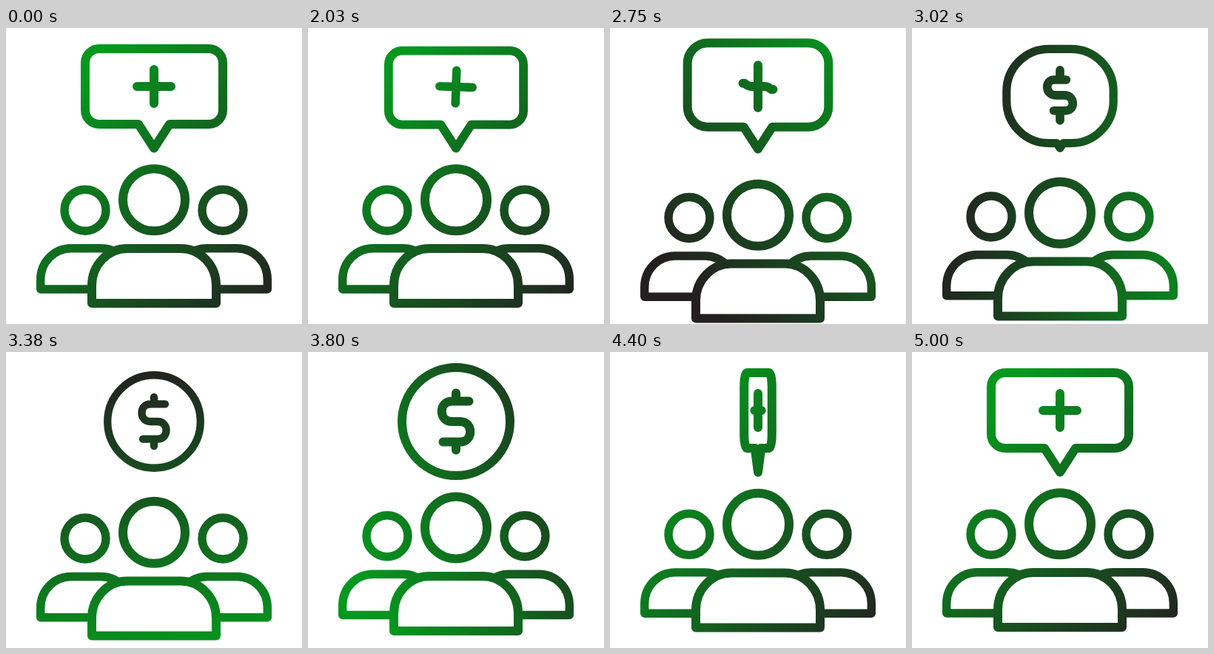
Animation of 400x400 px, one loop 5.03 s. Source, as an HTML page:

```html
<!DOCTYPE html>
<html lang="en">
<head>
<meta charset="utf-8">
<title>Group value</title>
<style>
  html, body { margin: 0; width: 100%; height: 100%; overflow: hidden; background: #fff; }
  svg { display: block; width: 100vw; height: 100vh; }
  .ink { fill: none; stroke: #fff; stroke-width: 12; stroke-linecap: round; stroke-linejoin: round; }
  .front { fill: #000; }
  #sides { stroke-width: 11.4; }
</style>
</head>
<body>
<svg viewBox="0 0 400 400">
  <defs>
    <linearGradient id="shade" gradientUnits="userSpaceOnUse" x1="50" y1="210" x2="450" y2="210">
      <stop offset="0" stop-color="#06981e"/>
      <stop offset="1" stop-color="#231f20"/>
    </linearGradient>
    <g id="side">
      <circle cx="107" cy="246.2" r="28"/>
      <path d="M46.7 353V339.7A41 42 0 0 1 87.7 297.7H128A42 42 0 0 1 170 339.7V353Z"/>
    </g>
    <mask id="lines" maskUnits="userSpaceOnUse" x="0" y="0" width="400" height="400">
      <g class="ink">
        <g id="sides">
          <use href="#side"/>
          <use href="#side" transform="matrix(-1 0 0 1 400 0)"/>
        </g>
        <g id="main">
          <circle cx="200" cy="232.3" r="42"/>
          <path class="front" d="M116 372V348A48 50 0 0 1 164 298H236A48 50 0 0 1 284 348V372Z"/>
        </g>
        <path id="bubble"/>
        <path id="sign"/>
      </g>
    </mask>
  </defs>
  <rect width="400" height="400" fill="url(#shade)" mask="url(#lines)"/>
</svg>
<script>
const LOOP = 5030, HOLD = 2030, STEP = 30;
const el = id => document.getElementById(id);
const lerp = (a, b, p) => a + (b - a) * p;

// Eased progress from 0 to 1 between two times, with a long settling end
function ease(t, from, to) {
  const u = Math.min(1, Math.max(0, (t - from) / (to - from)));
  const x = 1 - (1 - u) ** 1.4;
  return x * x * (3 - 2 * x);
}

// Grow from low to high, shrink while morphing, then spring to full size
function swell(t, low, high) {
  if (t < HOLD) return 1;
  const grown = lerp(low, high, ease(t, HOLD, 2550));
  const shrunk = lerp(grown, 0.86, ease(t, 2700, 3380));
  return lerp(shrunk, 1, ease(t, 3380, 3640));
}

// Speech bubble at p = 0, coin at p = 1; k squeezes it sideways
function bubblePath(p, k, s) {
  const anchor = lerp(163, 94, p);
  const x = v => 200 + v * k * s;
  const y = v => anchor + (v - anchor) * s;
  const w = lerp(93, 73, p), top = lerp(28, 21, p), bottom = lerp(130, 167, p);
  const r = lerp(19, 73, p), tail = lerp(21, 0, p), tip = lerp(162.5, 167, p);
  const corner = (cx, cy) => `A${r * k * s} ${r * s} 0 0 0 ${x(cx)} ${y(cy)}`;
  return `M${x(0)} ${y(tip)}L${x(tail)} ${y(bottom)}H${x(w - r)}` + corner(w, bottom - r)
    + `V${y(top + r)}` + corner(w - r, top) + `H${x(r - w)}` + corner(-w, top + r)
    + `V${y(bottom - r)}` + corner(r - w, bottom) + `H${x(-tail)}Z`;
}

// One half of the plus bar and of the S, relative to the middle
const BAR = [-23, -17, -14, -11, -8];
const CURL = [[17.5, -27.5], [-5.5, -27.5], [-23.8, -27.5], [-23.8, 0], [-5.5, 0]];

function signPath(p, k, s, tilt) {
  const c = Math.cos(tilt), n = Math.sin(tilt), mid = lerp(79, 94, p);
  const at = (x, y) =>
    `${200 + (x * c - y * n) * k * s} ${94 + (mid + x * n + y * c - 94) * s}`;
  const half = BAR.map((bx, i) => [lerp(bx, CURL[i][0], p), CURL[i][1] * p]);
  const a = half.map(([x, y]) => at(x, y));
  const b = half.map(([x, y]) => at(-x, -y));
  const near = lerp(0, 28, p), far = lerp(23, 38.5, p);
  return `M${a[0]}L${a[1]}C${a[2]} ${a[3]} ${a[4]}L${b[4]}C${b[3]} ${b[2]} ${b[1]}L${b[0]}`
    + `M${at(0, -far)}L${at(0, -near)}M${at(0, near)}L${at(0, far)}`;
}

function draw(time) {
  const t = time < HOLD ? 0 : HOLD + STEP * Math.floor((time - HOLD) / STEP);
  const drop = 21 * (ease(t, HOLD, 2600) - ease(t, 2600, 4760));
  const angle = 45 + 360 * ease(t, HOLD, 5000);
  // The coin turns edge-on and comes round as the bubble
  const flip = 1 - 2 * ease(t, 4080, 4790), k = Math.abs(flip);
  const p = flip < 0 ? 0 : ease(t, 2640, 3300);
  const size = swell(t, 0.98, 1.06), signSize = swell(t, 0.965, 1.16);
  const tilt = t < HOLD ? 0 : 0.035 * (1 - ease(t, HOLD, 2640));

  el('main').setAttribute('transform', `translate(0 ${drop})`);
  el('sides').setAttribute('transform', `translate(0 ${drop / 2})`);
  el('bubble').setAttribute('d', bubblePath(p, k, size));
  el('bubble').style.strokeWidth = 12 * Math.min(size, 1);
  el('sign').setAttribute('d', signPath(p, k, signSize, tilt));
  el('sign').style.strokeWidth = 12 * Math.min(signSize, 1);
  el('shade').setAttribute('gradientTransform', `rotate(${angle} 250 210)`);
}

const start = performance.now();
function tick() {
  draw((performance.now() - start) % LOOP);
  requestAnimationFrame(tick);
}
tick();
</script>
</body>
</html>
```
